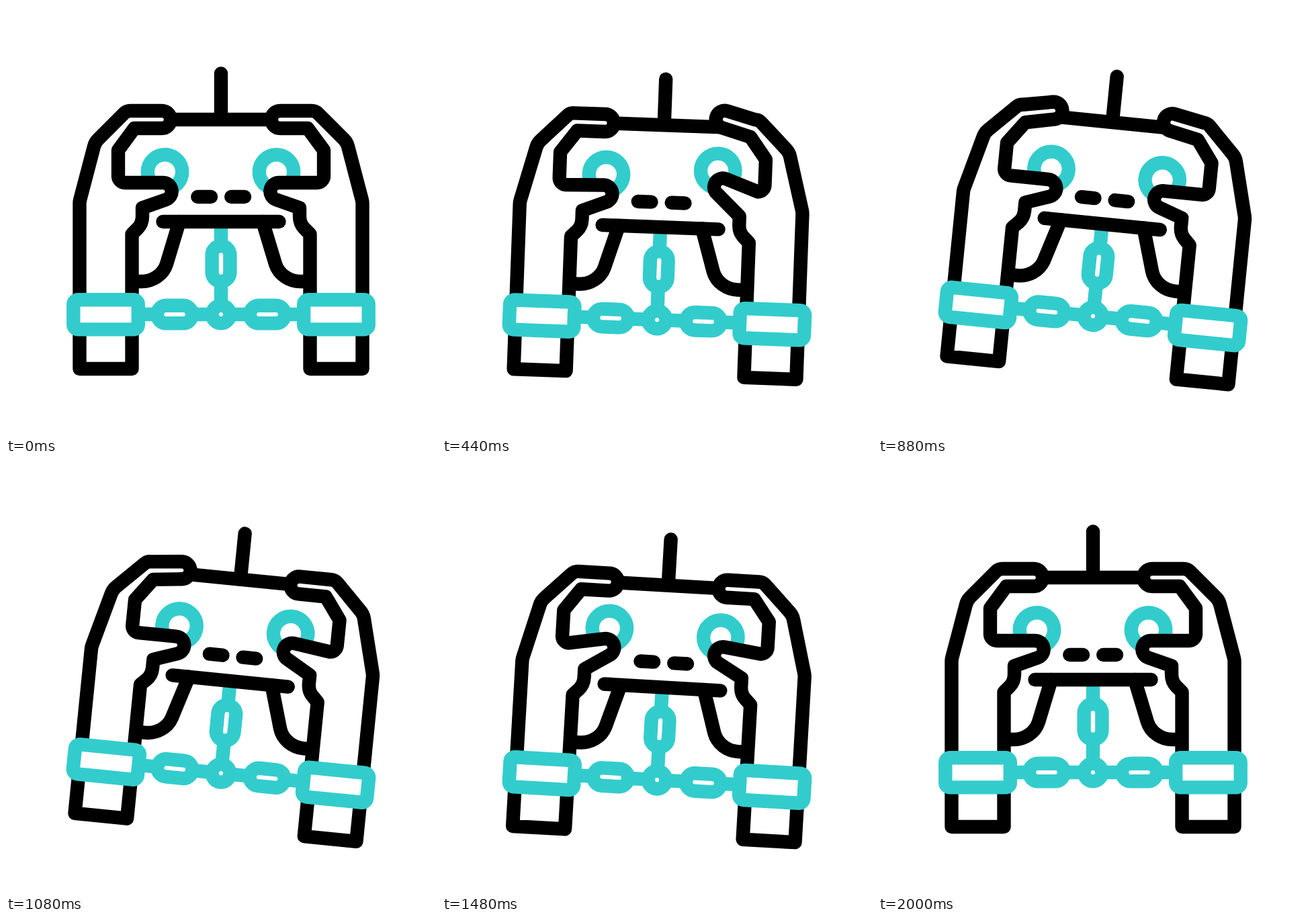
Write an HTML page that moves like this. It is 640 by 640 pixels and loops after 2040 ms.

```html
<!DOCTYPE html>
<html lang="en">
<head>
<meta charset="utf-8">
<title>Chained to the controller</title>
<style>
  html, body { margin: 0; width: 100%; height: 100%; overflow: hidden; background: #fff; }
  svg { display: block; width: 100vw; height: 100vh; }
  .ink, .teal { fill: none; stroke-width: 20.4; stroke-linejoin: round; }
  .ink { stroke: #000; stroke-linecap: round; }
  .teal { stroke: #33cccc; }
  .solid { fill: #fff; }
</style>
</head>
<body>
<svg viewBox="0 0 640 640">
  <defs>
    <path id="grip" d="M258 321 L239 384 C234 400 218 410 202 410 H190"/>
    <g id="cuff">
      <path d="M196 459 H220 M282 459 H302"/>
      <rect x="225" y="445.8" width="52" height="26.5" rx="13.2"/>
      <rect class="solid" x="100.3" y="437.2" width="96.5" height="44.2" rx="7"/>
    </g>
  </defs>
  <g id="scene">
    <g class="teal">
      <circle id="stickL" cx="236.5" cy="247" r="25.7"/>
      <circle id="stickR" cx="402.5" cy="247" r="25.7"/>
      <path d="M320 322 V352 M320 414 V442"/>
      <rect x="306.6" y="357" width="26.8" height="53" rx="13.4"/>
    </g>
    <g class="ink">
      <path d="M235 169 H405 M320 100.5 V169"/>
      <path d="M285.3 284 H305 M335.2 284 H355"/>
      <use href="#grip"/>
      <use href="#grip" transform="translate(640) scale(-1 1)"/>
      <path d="M233.5 321 H406.5"/>
      <path id="handL" class="solid"/>
      <path id="handR" class="solid" transform="translate(640) scale(-1 1)"/>
    </g>
    <g class="teal">
      <use href="#cuff"/>
      <use href="#cuff" transform="translate(640) scale(-1 1)"/>
      <circle cx="320" cy="459" r="13.3"/>
    </g>
  </g>
</svg>
<script>
  const LOOP = 2040, STEP = 40, TAP = 200;
  const byId = id => document.getElementById(id);
  const clamp = v => Math.min(1, Math.max(0, v));
  const ease = v => { const s = clamp(v); return s * s * (3 - 2 * s); };

  // Rise and fall around each peak time, 0 to 1.
  const pulse = (t, peaks, half) =>
    Math.max(...peaks.map(p => ease(1 - Math.abs(t - p) / half)));

  // Lifts a point around a pivot by an angle in degrees.
  function lift([x, y], [px, py], deg) {
    const a = -deg * Math.PI / 180, c = Math.cos(a), s = Math.sin(a);
    const dx = x - px, dy = y - py;
    return [px + dx * c - dy * s, py + dx * s + dy * c].map(v => v.toFixed(2)).join(" ");
  }

  // Left hand outline; only the two fingertips move.
  function handPath(index, thumb) {
    const tip = (x, y) => lift([x, y], [184, 169], index);
    const pad = (x, y) => lift([x, y], [177, 280], thumb);
    return `M109.5 540 V294 Q109.5 291 110.3 288 L131 209 Q132.5 203 137 198.5
      L175.5 160 Q179.5 156 185 156 L${tip(232, 156)} A13 13 0 0 1 ${tip(232, 182)}
      L191 182 L167 214.6 V253 A10 10 0 0 0 177 263
      L${pad(233, 263)} A13 13 0 0 1 ${pad(237.5, 288.4)}
      L203 300.5 V313 Q203 324 196 331 L187.5 339.5 V540 Z`;
  }

  const sides = [
    { id: "L", thumbs: [200, 600, 1400], indexes: [800, 1200, 1800], reach: 15 },
    { id: "R", thumbs: [400, 1200, 1600], indexes: [400, 800, 1800], reach: 21 }
  ];

  function draw(t) {
    const tilt = 6 * pulse(t, [800, 1000, 1200], 600);
    const drop = 12.5 * pulse(t, [600, 1400], 400);
    byId("scene").setAttribute("transform", `translate(0 ${drop}) rotate(${tilt} 320 459)`);
    for (const { id, thumbs, indexes, reach } of sides) {
      const press = pulse(t, thumbs, TAP);
      const tap = pulse(t, indexes, TAP);
      byId("hand" + id).setAttribute("d", handPath(16 * tap, reach * press));
      byId("stick" + id).setAttribute("transform", `translate(0 ${-14.5 * press})`);
    }
  }

  const start = performance.now();
  function tick() {
    const t = (performance.now() - start) % LOOP;
    draw(Math.floor(t / STEP) * STEP);
    requestAnimationFrame(tick);
  }
  tick();
</script>
</body>
</html>
```
